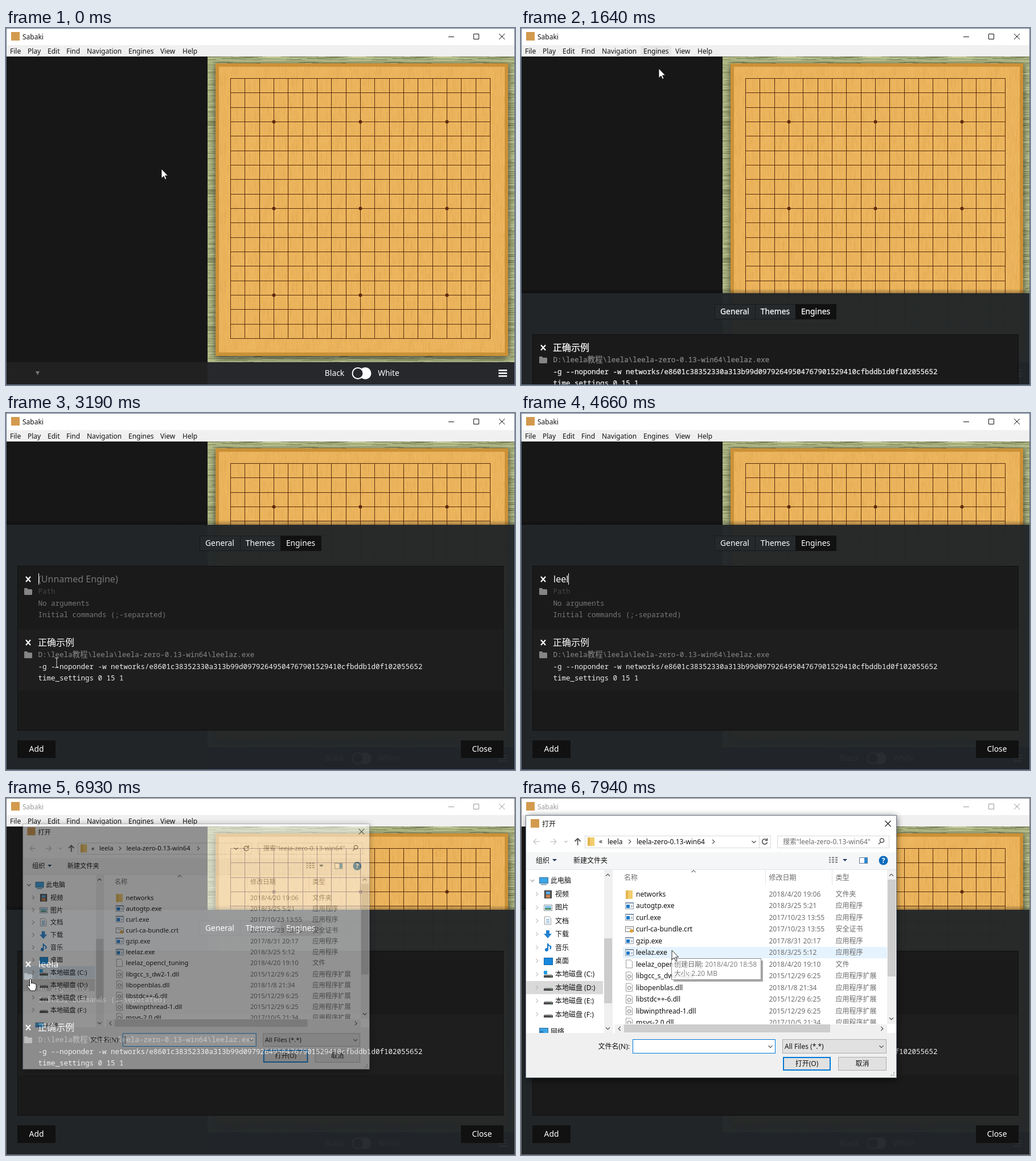
An HTML page that plays this animation: 894 px wide and 626 px high, repeating every 8000 ms.

```html
<!DOCTYPE html>
<html lang="zh-CN">
<head>
<meta charset="utf-8">
<style>
html, body { margin: 0; width: 100%; height: 100%; overflow: hidden; background: #171717; }
svg { display: block; width: 894px; height: 626px; }
text { font: 12px "Noto Sans", "Noto Sans CJK SC", "Noto Sans CJK", sans-serif; fill: #111; white-space: pre; }
.ui { font-size: 13.8px; fill: #fff; }
.name { font-size: 16px; fill: #fff; }
.mono { font: 12.5px "Noto Sans Mono", "Noto Sans CJK SC", "Noto Sans CJK", monospace; fill: #f0f0f0; }
.grey { fill: #6d6d6d; }
.hint { fill: #777; }
.faint { fill: #454545; }
.path { fill: #8a8a8a; }
.moving text { stroke: #fff; stroke-opacity: .4; stroke-width: .6px; }
.moving .path { stroke: #8a8a8a; }
.line { fill: none; stroke-width: 1.2; }
</style>
</head>
<body>
<svg id="stage" viewBox="0 0 894 626" xmlns="http://www.w3.org/2000/svg"></svg>
<script>
const LOOP = 8000;
const stage = document.getElementById('stage');

// markup helpers
const rect = (x, y, w, h, fill, more = '') =>
  `<rect x="${x}" y="${y}" width="${w}" height="${h}" fill="${fill}" ${more}/>`;
const box = (x, y, w, h, fill, stroke, more = '') =>
  rect(x + .5, y + .5, w - 1, h - 1, fill, `stroke="${stroke}" ${more}`);
const text = (x, y, s, cls = '', more = '') => `<text x="${x}" y="${y}" class="${cls}" ${more}>${s}</text>`;
const middle = (x, y, s, cls = '') => text(x, y, s, cls, 'text-anchor="middle"');
const line = (d, stroke, more = '') => `<path d="${d}" class="line" stroke="${stroke}" ${more}/>`;
const fillPath = (d, fill) => `<path d="${d}" fill="${fill}"/>`;
const group = (id, body, more = '') => `<g id="${id}" ${more}>${body}</g>`;
const down = (x, y, fill) => fillPath(`M${x - 4} ${y - 2}h8l-4 4z`, fill);
const chevron = (x, y, dir, c = '#555', s = 3.5) => {
  const [a, b] = { r: [1, 0], l: [-1, 0], d: [0, 1], u: [0, -1] }[dir];
  const h = s / 2;
  return line(`M${x - a * h - b * s} ${y - b * h - a * s}L${x + a * h} ${y + b * h}L${x - a * h + b * s} ${y - b * h + a * s}`, c);
};

let seed = 7;
const rand = () => (seed = seed * 16807 % 2147483647) / 2147483647;
const repeat = (n, f) => Array.from({ length: n }, (_, i) => f(i)).join('');
const pick = list => list[Math.floor(rand() * list.length)];

function defs() {
  const straw = repeat(520, () => rect((rand() * 170 - 20).toFixed(1), Math.floor(rand() * 120), (15 + rand() * 45).toFixed(1), 1,
    pick(['#cdd2a2', '#dadfb4', '#a4ac78', '#7e865a', '#626a45', '#bac18d']), 'opacity=".55"'));
  const grain = repeat(330, () => rect(Math.floor(rand() * 126), (rand() * 130 - 15).toFixed(1), 1, (5 + rand() * 18).toFixed(1),
    pick(['#c98a35', '#d4993f', '#f6c877']), 'opacity=".2"'));
  return `<defs>
    <pattern id="tatami" width="150" height="120" patternUnits="userSpaceOnUse">${rect(0, 0, 150, 120, '#aab27f')}${straw}</pattern>
    <pattern id="wood" width="126" height="120" patternUnits="userSpaceOnUse">${rect(0, 0, 126, 120, '#ebb45c')}${grain}</pattern>
    <linearGradient id="fade" x2="0" y2="1"><stop stop-opacity="0"/><stop offset="1" stop-opacity=".3"/></linearGradient>
    <filter id="blur" x="-20%" y="-20%" width="140%" height="140%"><feGaussianBlur stdDeviation="6"/></filter>
    <clipPath id="files"><rect x="162" y="126" width="482" height="270"/></clipPath>
    <clipPath id="tree"><rect x="9" y="126" width="137" height="286"/></clipPath>
    <clipPath id="boardArea"><rect x="354" y="50" width="540" height="536"/></clipPath>
  </defs>`;
}

function board() {
  const gap = 456 / 18;
  let grid = '';
  for (let i = 0; i < 19; i++) {
    const x = Math.round(394 + gap * i) + .5, y = Math.round(88 + gap * i) + .5;
    grid += `M394 ${y}H851M${x} 88V545`;
  }
  const stars = [3, 9, 15].flatMap(i => [3, 9, 15].map(j =>
    `<circle cx="${394.5 + gap * i}" cy="${88.5 + gap * j}" r="3" fill="#5c2a10"/>`)).join('');
  return `<g clip-path="url(#boardArea)">` + rect(354, 50, 540, 536, 'url(#tatami)') +
    rect(368, 65, 514, 513, '#000', 'opacity=".65" filter="url(#blur)"') +
    rect(368, 62, 514, 513, '#cb9138') + rect(374, 68, 502, 501, 'url(#wood)') + '</g>' +
    line(grid, '#5c2b0e', 'style="stroke-width:1"') + stars;
}

function mainWindow() {
  const menu = [['File', 7], ['Play', 38], ['Edit', 73], ['Find', 106], ['Navigation', 142], ['Engines', 215], ['View', 271], ['Help', 310]];
  return rect(0, 0, 894, 626, '#171717') + rect(0, 0, 894, 30, '#fff') + rect(0, 30, 894, 20, '#f0f0f0') +
    rect(9, 7, 15, 15, '#d39a4e') +
    group('caption', text(29, 19.5, 'Sabaki', '', 'style="fill:inherit"') +
      line('M777 15.5H787M821.5 10.5h9v9h-9zM866 10l10 10M876 10l-10 10', 'currentColor', 'style="stroke-width:1"')) +
    rect(210, 31, 54, 18, '#cce8ff', 'id="menuHot"') +
    menu.map(([s, x]) => text(x, 45, s)).join('') + board() +
    rect(0, 586, 354, 40, '#212121') + rect(354, 586, 540, 40, '#26282c') +
    fillPath('M52 602h7l-3.500 6.500z', '#777') +
    middle(577, 610, 'Black', 'ui') + middle(672, 610, 'White', 'ui') +
    '<circle cx="631" cy="605.500" r="10.500" fill="#fff"/><circle cx="618" cy="605.500" r="9.500" fill="#26282c" stroke="#fff" stroke-width="2"/>' +
    [599, 604, 609].map(y => rect(865, y, 15, 2.6, '#fff')).join('');
}

function dropdown() {
  const items = ['Manage Engines…', '', 'Attach…', 'Detach', 'Suspend', '', 'Synchronize|F6', 'Start Playing|F5', 'Generate Move|F10', '', 'Toggle GTP Console|F12', 'Clear Console'];
  let y = 52, out = rect(215, 55, 203, 223, '#000', 'opacity=".3"') + box(210, 50, 203, 223, '#f2f2f2', '#ccc') +
    rect(213, 52, 197, 22, '#91c9f7', 'id="manageHot"');
  for (const item of items) {
    if (item) {
      const [label, key] = item.split('|');
      out += text(242, y + 15.5, label) + (key ? text(372, y + 15.5, key) : '');
      y += 22;
    } else {
      out += rect(240, y + 3, 170, 1, '#d0d0d0');
      y += 7;
    }
  }
  return out;
}

const engineIcons = line('M35 287l8 9M43 287l-8 9', '#fff', 'style="stroke-width:2.2"') +
  fillPath('M32 308q0-1 1-1h4l1.500 2h6q1.500 0 1.500 1.500v7q0 1.500-1.500 1.500h-11q-1.500 0-1.500-1.500z', '#858585');

function drawer() {
  const tabs = ['General', 'Themes', 'Engines'];
  const cjk = s => `<tspan font-size="13.600">${s}</tspan>`;
  return rect(1, 188, 892, 8, 'url(#fade)') + rect(1, 196, 892, 430, '#222629', 'fill-opacity=".965"') +
    box(340, 215, 214, 27, '#25292b', '#171a1c') + rect(482, 215, 72, 27, '#111') + rect(411, 216, 1, 25, '#171a1c') +
    tabs.map((s, i) => middle(375.5 + 71 * i, 233, s, 'ui')).join('') +
    box(20, 268, 854, 289, '#1a1a1a', '#101010') +
    group('blankEngine', rect(21, 379, 852, 107, '#1e1e1e') + engineIcons +
      text(57, 296.5, '(Unnamed Engine)', 'name hint', 'id="placeholder"') +
      text(57, 296.5, '', 'name', 'id="typed"') + rect(57, 281, 1, 20, '#fff', 'id="caret"') +
      text(56.5, 317, 'Path', 'mono faint') + text(56.5, 337.5, 'No arguments', 'mono hint') +
      text(56.5, 358, 'Initial commands (;-separated)', 'mono hint')) +
    group('savedEngine', engineIcons + text(56, 296.5, '正确示例', 'name') +
      text(56.5, 317, `D:\\leela${cjk('教程')}\\leela\\leela-zero-0.13-win64\\leelaz.exe`, 'mono path') +
      text(56.5, 337.5, '-g --noponder -w networks/e8601c38352330a313b99d09792649504767901529410cfbddb1d0f102055652', 'mono') +
      text(56.5, 358, 'time_settings 0 15 1', 'mono')) +
    rect(20, 574, 67, 31, '#111') + middle(53.5, 594, 'Add', 'ui') +
    rect(799, 574, 75, 31, '#111') + middle(836, 594, 'Close', 'ui');
}

// small icons centred on x, y
const page = (x, y) => fillPath(`M${x - 5.5} ${y - 7}h8l3 3v11h-11z`, '#fff') + line(`M${x - 5.5} ${y - 7}h8l3 3v11h-11z`, '#999', 'style="stroke-width:1"');
const icons = {
  folder: (x, y) => rect(x - 6, y - 7, 12, 15, '#f3cd6d') + rect(x - 6, y - 7, 4, 15, '#e3b54e'),
  exe: (x, y) => box(x - 7, y - 6, 15, 12, '#fff', '#8b98a5') + rect(x - 7, y - 6, 15, 2, '#7e93a8') + rect(x - 5, y - 2, 6, 6, '#1979ca') + rect(x + 3, y - 1, 3, 4, '#b5c7d8'),
  crt: (x, y) => box(x - 7, y - 5, 15, 10, '#fff', '#777') + rect(x - 4, y - 2, 8, 1, '#888') + `<circle cx="${x + 4}" cy="${y + 3}" r="3" fill="#e0a12c"/>`,
  file: page,
  dll: (x, y) => page(x, y) + `<circle cx="${x}" cy="${y + 1}" r="2.800" fill="none" stroke="#777" stroke-width="1.600" stroke-dasharray="1.500 .7"/>`,
  pc: (x, y) => box(x - 7, y - 6, 16, 11, '#3ba5e6', '#3b6f96') + rect(x - 4, y + 6, 10, 1.5, '#5d88a8'),
  film: (x, y) => box(x - 6, y - 7, 13, 14, '#555', '#333') + rect(x - 3, y - 5, 7, 5, '#5ba6dd') + rect(x - 3, y + 1, 7, 5, '#cf8349'),
  image: (x, y) => box(x - 7, y - 5, 15, 11, '#fff', '#8b98a5') + rect(x - 5, y - 3, 11, 4, '#82c2ea') + rect(x - 5, y + 1, 11, 3, '#4d8c67'),
  doc: (x, y) => page(x, y) + line(`M${x - 3} ${y - 2}h6m-6 3h6m-6 3h6`, '#3f8ac4'),
  arrow: (x, y) => fillPath(`M${x - 3} ${y - 7}h6v6h4l-7 8-7-8h4z`, '#2482d0'),
  note: (x, y) => line(`M${x} ${y + 4}v-11q1 4 5 5q1 3-1 5`, '#1979ca', 'style="stroke-width:2"') + `<circle cx="${x - 2}" cy="${y + 4}" r="3" fill="#1979ca"/>`,
  desk: (x, y) => box(x - 7, y - 6, 16, 13, '#1688dc', '#1063a5'),
  disk: (x, y) => rect(x - 6, y, 14, 3, '#bbb') + rect(x - 7, y + 2, 16, 4, '#4d4d4d') + rect(x + 5, y + 3, 2, 1, '#6de06d'),
  system: (x, y) => icons.disk(x, y) + rect(x - 7, y - 6, 6, 6, '#1c9be6'),
  net: (x, y) => icons.pc(x, y) + `<circle cx="${x - 3}" cy="${y + 3}" r="4" fill="#2f7fbd"/>`
};

const FILES = `networks|2018/4/20 19:06|文件夹|folder
autogtp.exe|2018/3/25 5:21|应用程序|exe
curl.exe|2017/10/23 13:55|应用程序|exe
curl-ca-bundle.crt|2017/10/23 13:55|安全证书|crt
gzip.exe|2017/8/31 20:17|应用程序|exe
leelaz.exe|2018/3/25 5:12|应用程序|exe
leelaz_opencl_tuning|2018/4/20 19:10|文件|file
libgcc_s_dw2-1.dll|2015/12/29 6:25|应用程序扩展|dll
libopenblas.dll|2018/1/8 21:34|应用程序扩展|dll
libstdc++-6.dll|2015/12/29 6:25|应用程序扩展|dll
libwinpthread-1.dll|2015/12/29 6:25|应用程序扩展|dll
msys-2.0.dll|2017/10/5 21:34|应用程序扩展|dll`.split('\n').map(row => row.split('|'));
const TREE = [['视频', 'film'], ['图片', 'image'], ['文档', 'doc'], ['下载', 'arrow'], ['音乐', 'note'], ['桌面', 'desk'],
  ['本地磁盘 (C:)', 'system'], ['本地磁盘 (D:)', 'disk'], ['本地磁盘 (E:)', 'disk'], ['本地磁盘 (F:)', 'disk']];
const fileY = i => 168.5 + 20.45 * i;
const treeY = i => 168.5 + 23.4 * i;

function dialog() {
  const files = FILES.map(([name, date, type, icon], i) => {
    const y = fileY(i);
    return icons[icon](190, Math.round(y)) + text(202, y + 4.5, name) + text(435.5, y + 4.5, date, 'grey') + text(552.5, y + 4.5, type, 'grey');
  }).join('');
  const tree = TREE.map(([name, icon], i) => icons[icon](47, Math.round(treeY(i))) + text(60, treeY(i) + 4.5, name)).join('');
  return rect(12, 32, 648, 462, '#000', 'opacity=".6" filter="url(#blur)"') +
    box(8, 30, 652, 461, '#fff', '#6e7882') + rect(17, 37, 15, 15, '#d39a4e') + text(37, 50, '打开') +
    line('M639.500 40l10 10M649.500 40l-10 10', '#222') +
    line('M33 76.500H22m5-5l-5 5 5 5M51 76.500h11m-5-5l5 5-5 5', '#ccc', 'style="stroke-width:1.600"') + chevron(79, 76.5, 'd', '#bbb', 2.5) +
    line('M99.500 83V71m-5 5l5-5 5 5', '#555', 'style="stroke-width:1.800"') +
    box(112, 66, 327, 22, '#fff', '#d9d9d9') + icons.folder(123, 76) + text(137, 80, '«') + text(152, 80.5, 'leela') + chevron(191, 76.5, 'r') +
    text(203, 80.5, 'leela-zero-0.13-win64') + chevron(338, 76.5, 'r') + chevron(409, 77, 'd', '#444') + rect(418, 67, 1, 20, '#d9d9d9') +
    line('M431.500 73.500a4.500 4.500 0 1 0 1 4M432.500 70.500v4h-4', '#555', 'style="stroke-width:1.600"') +
    box(450, 66, 197, 22, '#fff', '#d9d9d9') + text(460, 80.5, '搜索"leela-zero-0.13-win64"', 'grey') +
    line('M628 81l4-4M637.500 74.500a3.500 3.500 0 1 1-7 0a3.500 3.500 0 1 1 7 0', '#555', 'style="stroke-width:1.500"') +
    rect(9, 95, 650, 30, '#f5f6f7') + rect(9, 125, 650, 1, '#e3e4e6') + text(26, 114, '组织') + down(59, 109, '#1e395b') + text(92, 114, '新建文件夹') +
    line('M541 104.500h3m2 0h4m2 0h4M541 108.500h3m2 0h4m2 0h4M541 112.500h3m2 0h4m2 0h4', '#777', 'style="stroke-width:2"') + down(569, 109, '#1e395b') +
    box(594, 104, 15, 11, '#fff', '#5a7b99') + rect(603, 105, 5, 9, '#2d8ad0') +
    '<circle cx="636.500" cy="109.500" r="8" fill="#0f6cbd"/>' + middle(636.5, 114, '<tspan fill="#fff" font-weight="700">?</tspan>') +
    `<g clip-path="url(#tree)">` + rect(9, 321, 135, 23, '#d9d9d9') + rect(9, 297, 135, 23, '#e0f0fb', 'id="treeHot"') +
    group('chevrons', chevron(20, 145, 'd', '#666') + TREE.map((_, i) => chevron(28, treeY(i), 'r', '#999')).join('')) +
    icons.pc(39, 145) + text(52, 149, '此电脑') + tree + icons.net(39, 409) + text(52, 413.5, '网络') + '</g>' +
    rect(146, 126, 15, 286, '#f0f0f0') + rect(146, 246, 14, 114, '#cdcdcd') + chevron(152.5, 135, 'u') + chevron(152.5, 404, 'd') +
    text(181, 143.5, '名称', 'grey') + text(435.5, 143.5, '修改日期', 'grey') + text(552.5, 143.5, '类型', 'grey') + chevron(303, 128.5, 'u', '#777') +
    rect(429, 126, 1, 27, '#e5e5e5') + rect(546, 126, 1, 27, '#e5e5e5') +
    `<g clip-path="url(#files)">` + rect(179, 0, 464, 20, '#e5f3ff', 'id="fileHot"') + files + '</g>' +
    rect(643, 126, 16, 270, '#f0f0f0') + rect(644, 143, 14, 170, '#cdcdcd') + chevron(650.5, 135, 'u') + chevron(650.5, 387, 'd') +
    rect(165, 397, 478, 15, '#f0f0f0') + rect(181, 397, 362, 14, '#cdcdcd') + chevron(173, 404.5, 'l') + chevron(634, 404.5, 'r') +
    rect(9, 412, 650, 78, '#f0f0f0') + text(191, 440, '文件名(N):', '', 'text-anchor="end"') +
    box(196, 423, 251, 25, '#fff', '#0078d7') + chevron(438, 436, 'd') + rect(200, 428, 1, 15, '#000', 'id="fileCaret"') +
    box(459, 423, 183, 25, '#e1e1e1', '#adadad') + text(463, 440, 'All Files (*.*)') + chevron(633, 436, 'd') +
    rect(461, 455, 82, 22, '#e1e1e1', 'stroke="#0078d7" stroke-width="2"') + middle(502, 470, '打开(O)') +
    box(557, 454, 85, 24, '#e1e1e1', '#adadad') + middle(599.5, 470, '取消') +
    [[655, 487], [651, 487], [655, 483]].map(([x, y]) => rect(x - 1, y - 2, 2, 2, '#aaa')).join('');
}

const tooltip = rect(268, 285, 157, 37, '#000', 'opacity=".4"') + box(264, 281, 158, 38, '#fff', '#767676') +
  text(269, 295.5, '创建日期: 2018/4/20 18:58', 'grey') + text(269, 312, '大小: 2.20 MB', 'grey');

const pointers =
  group('arrow', '<path d="M0 0V16.500L4 13L6.500 18.500L9 17.500L6.500 12H11.500Z" fill="#fff" stroke="#111" stroke-width=".9"/>') +
  group('beam', line('M-3 -8.500H-1Q0 -8.500 0 -7.500Q0 -8.500 1 -8.500H3M0 -8V8M-3 8.500H-1Q0 8.500 0 7.500Q0 8.500 1 8.500H3', '#ddd', 'style="stroke-width:1"')) +
  group('hand', '<path d="M-1.500 1Q0 -1 1.500 1V8Q3 6 4.500 8Q6 7 7.500 9Q9 8 10 10V16Q9 18 8 21H0Q-2 17 -6 13Q-5 10 -1.500 13Z" fill="#fff" stroke="#111"/>');

stage.innerHTML = defs() + mainWindow() + group('dropdown', dropdown()) + group('drawer', drawer()) +
  rect(.5, .5, 893, 625, 'none', 'id="frame"') + group('dialog', dialog()) + group('tooltip', tooltip) + group('pointer', pointers);
const el = {};
stage.querySelectorAll('[id]').forEach(n => el[n.id] = n);

// start, end and number of redraws of each burst of motion
const BURSTS = [[390, 640, 4], [880, 1180, 5], [1330, 2090, 11], [2170, 2940, 11], [3020, 3560, 8],
  [5540, 6320, 11], [6400, 6780, 6], [6930, 7710, 11], [7790, 7940, 3]];
// time, x, y of the mouse
const MOUSE = [[310, 273, 247], [640, 237, 41], [880, 238, 42], [1180, 245, 62], [1480, 246, 64], [1634, 242, 71],
  [1862, 238, 134], [2090, 236, 194], [2170, 232, 212], [2630, 70, 588], [2780, 72, 588], [2940, 92, 569],
  [3174, 89, 438], [3560, 103, 290], [5460, 103, 290], [5850, 84, 452], [6242, 56, 338], [6320, 53, 331],
  [6476, 43, 317], [7100, 43, 317], [7710, 265, 267]];
const KEYS = [4110, 4340, 4430, 4660, 4910];

const clamp = v => Math.max(0, Math.min(1, v));
const show = (node, on) => node.setAttribute('visibility', on ? 'inherit' : 'hidden');
const set = (node, name, value) => node.setAttribute(name, value);

function heldTime(t) {
  const burst = BURSTS.filter(b => b[0] <= t).pop();
  if (!burst) return 0;
  const [start, end, n] = burst, gap = (end - start) / (n - 1);
  return start + gap * Math.min(n - 1, Math.floor((t - start) / gap + .2));
}

function mouseAt(t) {
  const i = MOUSE.findIndex(k => k[0] > t);
  if (i < 0) return MOUSE[MOUSE.length - 1].slice(1);
  if (!i) return MOUSE[0].slice(1);
  const [a, b] = [MOUSE[i - 1], MOUSE[i]], p = (t - a[0]) / (b[0] - a[0]);
  return [1, 2].map(k => Math.round(a[k] + (b[k] - a[k]) * p));
}

// the CSS "ease" curve, solved by bisection
function ease(x) {
  const curve = (s, a, b) => 3 * (1 - s) ** 2 * s * a + 3 * (1 - s) * s * s * b + s ** 3;
  let lo = 0, hi = 1;
  for (let i = 0; i < 20; i++) {
    const mid = (lo + hi) / 2;
    if (curve(mid, .25, .25) < x) lo = mid; else hi = mid;
  }
  return curve(lo, .1, 1);
}

function render(t) {
  const held = heldTime(t), [mx, my] = mouseAt(held);
  const inactive = held >= 6620;

  set(el.caption, 'style', inactive ? 'fill:#999;color:#999' : 'fill:#111;color:#111');
  set(el.frame, 'stroke', inactive ? '#777' : '#5f7590');
  show(el.menuHot, held >= 880 && held < 1780);
  set(el.menuHot, 'fill', held < 1330 ? '#cce8ff' : '#e6e6e6');
  show(el.dropdown, held >= 950 && held < 1400);
  set(el.dropdown, 'opacity', clamp((held - 900) / 130));
  show(el.manageHot, my >= 52);

  const slide = ease(clamp((held - 1519.5) / 487));
  show(el.drawer, slide > 0);
  set(el.drawer, 'transform', `translate(0 ${Math.round(430 * (1 - slide))})`);
  set(el.drawer, 'class', slide < .999 ? 'moving' : '');

  const added = held >= 2780;
  const typed = KEYS.filter(k => k <= t).length;
  show(el.blankEngine, added);
  set(el.savedEngine, 'transform', `translate(0 ${added ? 111 : 0})`);
  show(el.placeholder, added && !typed);
  el.typed.textContent = 'leela'.slice(0, typed);
  const blinkFrom = typed ? KEYS[typed - 1] : 2890;
  const lit = Math.floor((t - blinkFrom) / (typed ? 480 : 500)) % 2 === 0;
  show(el.caret, added && t >= 2890 && lit && held < 6400);
  set(el.caret, 'x', typed ? 57 + Math.round(el.typed.getComputedTextLength()) : 57);

  const open = clamp((held - 6890) / 250);
  const scale = 1 - .1 * (1 - open) ** 2.5;
  show(el.dialog, open > 0);
  set(el.dialog, 'opacity', open ** .35);
  set(el.dialog, 'transform', `translate(334 260.500) scale(${scale}) translate(-334 -260.500)`);
  const treeRow = Math.round((my - 168.5) / 23.4), fileRow = Math.round((my - 168.5) / 20.45);
  show(el.treeHot, open > 0 && mx < 144);
  set(el.treeHot, 'y', Math.round(treeY(treeRow) - 11.5));
  show(el.fileHot, open > 0 && mx > 179);
  set(el.fileHot, 'y', Math.round(fileY(fileRow) - 10));
  set(el.chevrons, 'opacity', held < 7790 ? 1 : 1 - clamp((held - 7715) / 225) * .4);
  show(el.fileCaret, open > 0 && t < 7530);
  show(el.tooltip, held >= 7790);
  set(el.tooltip, 'opacity', clamp((held - 7720) / 260));

  const onField = added && !open && mx >= 57 && ((my > 280 && my < 363) || (my > 391 && my < 474));
  const onFolder = added && held < 7160 && mx < 48 && my > 305 && my < 321;
  show(el.pointer, t < 4110 || t >= 5540);
  set(el.pointer, 'transform', `translate(${mx} ${my})`);
  show(el.beam, onField);
  show(el.hand, onFolder);
  show(el.arrow, !onField && !onFolder);
}

const began = performance.now();
(function tick() {
  render((performance.now() - began) % LOOP);
  requestAnimationFrame(tick);
})();
</script>
</body>
</html>
```
